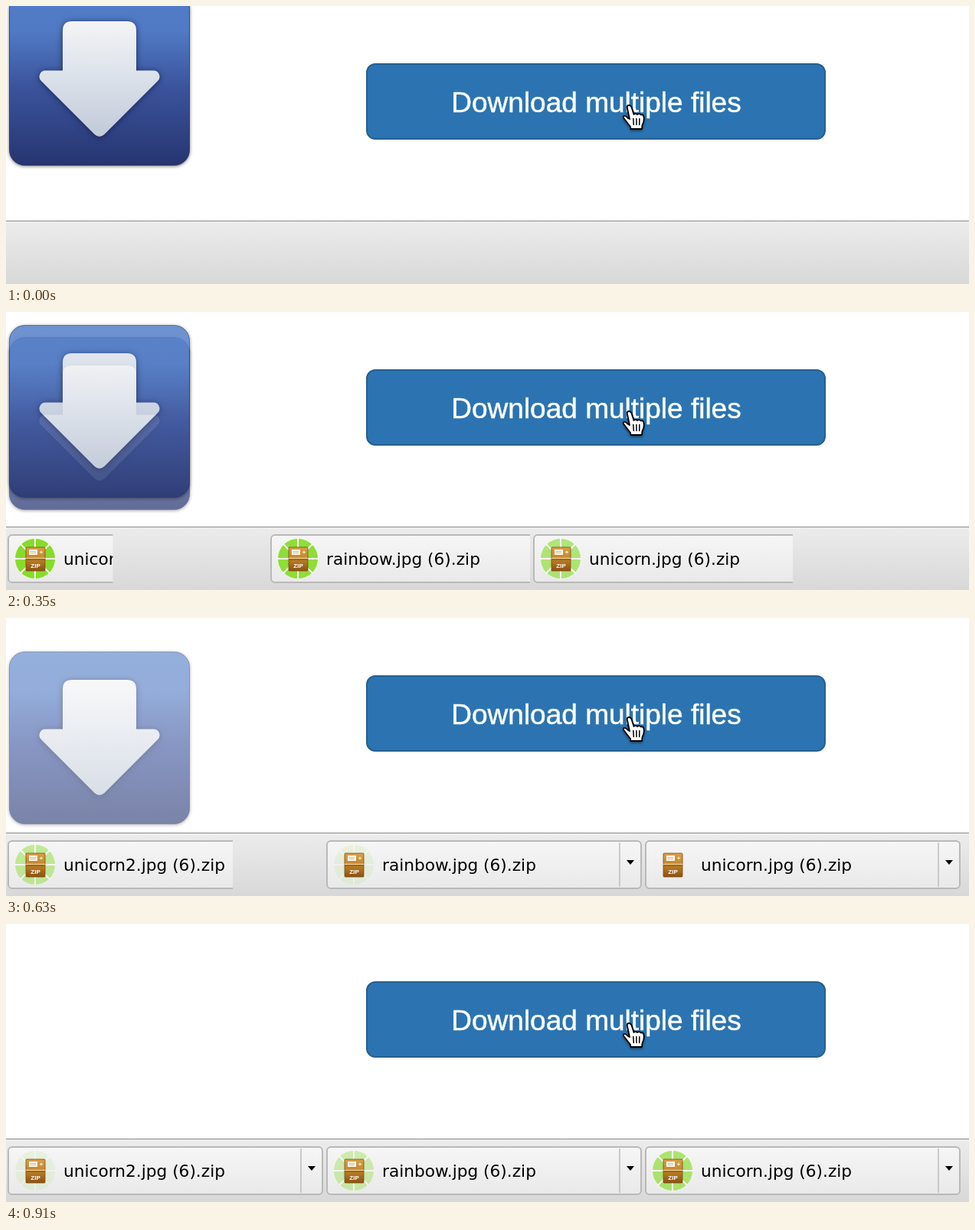
Recreate the animation shown at these times as an HTML page. Size 1257 by 364 pixels, loop 1.91 s.

```html
<!DOCTYPE html>
<html>
<head>
<meta charset="utf-8">
<style>
  html, body { margin: 0; width: 100%; height: 100%; overflow: hidden; background: #fff; }
  svg { display: block; }
  .title { font: 37px "Liberation Sans", Arial, sans-serif; fill: #fff; stroke: #fff; stroke-width: .5; text-anchor: middle; }
  .label { font: 21.7px "DejaVu Sans", sans-serif; }
  .zip { font: bold 8px "Liberation Sans", Arial, sans-serif; fill: #fff; text-anchor: middle; }
  .app { filter: drop-shadow(0 1px 2px rgba(0, 0, 0, .55)); }
  .arrow { filter: drop-shadow(0 1px 4px rgba(15, 25, 70, .75)); }
  .hand { filter: drop-shadow(0 2px 1.5px rgba(0, 0, 0, .4)); }
</style>
</head>
<body>
<svg id="stage" width="1257" height="364" viewBox="0 0 1257 364">
  <defs>
    <linearGradient id="shelf" x2="0" y2="1">
      <stop stop-color="#ececec"/><stop offset="1" stop-color="#d8d8d8"/>
    </linearGradient>
    <linearGradient id="card" x2="0" y2="1">
      <stop stop-color="#f5f6f5"/><stop offset="1" stop-color="#e9e9e9"/>
    </linearGradient>
    <linearGradient id="blue" x2="0" y2="1">
      <stop stop-color="#527cc7"/><stop offset=".22" stop-color="#507ac4"/>
      <stop offset=".55" stop-color="#3b539c"/><stop offset="1" stop-color="#263570"/>
    </linearGradient>
    <linearGradient id="silver" x2="0" y2="1">
      <stop stop-color="#f3f4f4"/><stop offset=".4" stop-color="#e0e5ed"/>
      <stop offset="1" stop-color="#c0cad8"/>
    </linearGradient>
    <linearGradient id="wood" x2="0" y2="1">
      <stop stop-color="#d9a04a"/><stop offset=".45" stop-color="#c48731"/>
      <stop offset=".55" stop-color="#b97c26"/><stop offset="1" stop-color="#8a5212"/>
    </linearGradient>

    <g id="icon" class="app">
      <rect x="4.5" y=".5" width="235" height="225" rx="20" fill="url(#blue)" stroke="#1d2b5c" stroke-opacity=".7"/>
      <path class="arrow" fill="url(#silver)" d="M86 37H158Q170 37 170 49V101.500H192
        A8 8 0 0 1 197.700 115.500L128.500 185Q122 191 115.500 185L46.300 115.500
        A8 8 0 0 1 52 101.500H74V49Q74 37 86 37Z"/>
    </g>

    <g id="box">
      <rect x="24" y="308" width="25" height="31" rx="1" fill="url(#wood)" stroke="#7d4c12" stroke-width=".8"/>
      <path d="M24 322.500H49" stroke="#f0cf8a" stroke-width="1.500"/>
      <path d="M24 324H49" stroke="#75440d"/>
      <rect x="28" y="311" width="11" height="7" fill="#fbf7ea"/>
      <path d="M29.500 313.500H37M29.500 315.500H37" stroke="#c9b48c" stroke-width=".8"/>
      <path d="M42 314.500H46M44 312.500V316.500" stroke="#fff0c0"/>
      <text class="zip" x="36.500" y="335">ZIP</text>
    </g>

    <g id="wheel">
      <circle cx="36" cy="323" r="26.500" fill="#87dc2b" stroke="#fff" stroke-opacity=".7"/>
      <path d="M36 296V350M9 323H63M17 304L55 342M55 304L17 342" stroke="#fff" stroke-width="2"/>
    </g>
  </defs>

  <rect width="1257" height="364" fill="#fff"/>
  <g id="icons"></g>
  <rect y="282" width="1257" height="82" fill="url(#shelf)"/>
  <path d="M0 281.500H1257" stroke="#8c8c8c"/>
  <g id="items"></g>
  <rect x="471" y="76" width="598" height="98" rx="11" fill="#2b74b1" stroke="#265f92" stroke-width="2"/>
  <text class="title" x="770.500" y="139">Download multiple files</text>
  <g class="hand" stroke="#000" stroke-linejoin="round" stroke-linecap="round">
    <path fill="#fff" stroke-width="1.800" d="M811 134Q810 130 813 130Q816 130 817 134L819.500 142
      Q821 139.500 824 142Q827 140 828.500 142.500Q832 141.500 832.500 145Q833.500 151 830.500 156
      L830 161H815.500L815 158Q811 153 808 149Q804.500 145 806.500 144Q809 143 812 147L814 148Z"/>
    <path d="M818.800 147.500L819.300 155.500M822.900 147.500L823 155.500M826.900 147.500L826.700 155.500" stroke-width="1.500"/>
  </g>
</svg>
<script>
const STEP = 70, HOLD_AT = 910, LOOP = 1910, OPEN_AT = 210;
const TIMES = [210, 280, 420, 630, 770, 910];
const STARTS = [0, 140];
const FIRST_WIDTH = [66, 103, 172, 294, 363, 412];
const FILES = [
  { name: 'unicorn2', glow: [1, 1, 1, .45, .05, .1] },
  { name: 'rainbow', glow: [1, 1, .85, .1, .02, .35] },
  { name: 'unicorn', glow: [.95, .8, .42, 0, .05, .65] }
];
const $ = id => document.getElementById(id);

function set(el, attrs) {
  for (const key in attrs) el.setAttribute(key, attrs[key]);
}

// Linear interpolation through the values at TIMES
function track(values, t) {
  let i = 1;
  while (i < TIMES.length - 1 && t > TIMES[i]) i++;
  const u = (t - TIMES[i - 1]) / (TIMES[i] - TIMES[i - 1]);
  return values[i - 1] + (values[i] - values[i - 1]) * u;
}

$('icons').innerHTML = STARTS.map(() => '<use href="#icon"/>').join('');
$('items').innerHTML = FILES.map(({ name }) => `
  <svg height="364">
    <rect x="1" y="292" width="410" height="62" rx="5" fill="url(#card)" stroke="#b9b9b9" stroke-width="2"/>
    <path d="M383 294V352" stroke="#bdbdbd" stroke-width="1.500"/>
    <path d="M392 317H402L397 323Z"/>
    <use class="glow" href="#wheel"/>
    <use href="#box"/>
    <text class="label name" x="73" y="331">${name}.jpg (6).zip</text>
    <text class="label status" x="73" y="347" fill="#8f8f8f">56/56 KB</text>
  </svg>`).join('');

const icons = [...$('icons').children];
const items = [...$('items').children];

function draw(t) {
  icons.forEach((icon, i) => {
    const age = t - STARTS[i];
    const y = -17 + .19 * age - .000134 * age * age;
    set(icon, {
      transform: `translate(0 ${y.toFixed(1)})`,
      opacity: 1 - age * .0008,
      visibility: age >= 0 && age < 630 ? 'visible' : 'hidden'
    });
  });

  $('items').setAttribute('visibility', t < OPEN_AT ? 'hidden' : 'visible');
  if (t < OPEN_AT) return;
  const slot = Math.min(416, 270 + (t - 280) * 73 / 70);
  items.forEach((item, i) => {
    const loading = i === 0 && t < 350;
    set(item, { x: 2 + i * slot, width: i ? slot - 4 : track(FIRST_WIDTH, t) });
    set(item.querySelector('.glow'), { opacity: track(FILES[i].glow, t) });
    set(item.querySelector('.name'), { y: loading ? 323 : 331 });
    set(item.querySelector('.status'), { opacity: loading ? 1 : 0 });
  });
}

const start = performance.now();
function tick() {
  const t = (performance.now() - start) % LOOP;
  draw(Math.min(HOLD_AT, Math.floor(t / STEP) * STEP));
  requestAnimationFrame(tick);
}
tick();
</script>
</body>
</html>
```
